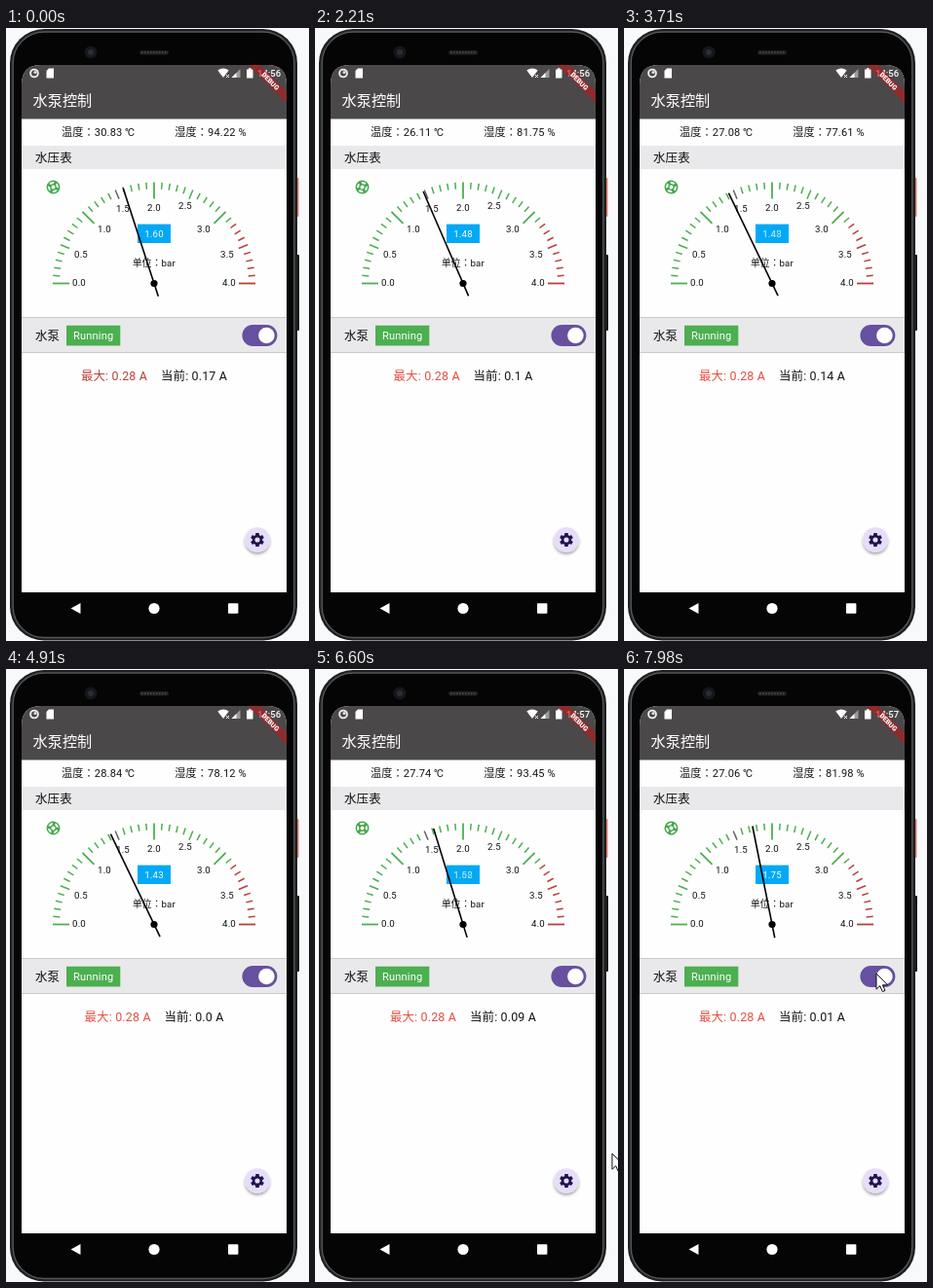
An HTML page for the animation above (8000 ms loop, 311 by 630 pixels).

```html
<!DOCTYPE html>
<html>
<head>
<meta charset="utf-8">
<title>水泵控制</title>
<style>
html, body { margin: 0; width: 100%; height: 100%; overflow: hidden; background: #f8f9fb; }
body { position: relative; font-family: Roboto, "Noto Sans CJK JP", "Noto Sans CJK", sans-serif; letter-spacing: .17px; }
svg { position: absolute; left: 0; top: 0; }
.row { position: absolute; left: 16px; width: 272px; height: 20px; line-height: 20px; display: flex; white-space: pre; color: #151515; }
#climate { top: 98px; font-size: 11.07px; justify-content: space-evenly; }
#amps { top: 347.5px; font-size: 12.46px; justify-content: center; gap: 13.8px; }
</style>
</head>
<body>
<svg width="311" height="630" viewBox="0 0 311 630">
  <defs>
    <clipPath id="screen"><path d="M16 580V58Q16 38 36 38H268Q288 38 288 58V580Z"/></clipPath>
    <filter id="shadow" x="-50%" y="-50%" width="200%" height="200%">
      <feDropShadow dx="0" dy="2" stdDeviation="1.8" flood-opacity=".36"/>
    </filter>
  </defs>

  <!-- phone -->
  <rect x="296" y="154" width="4.5" height="40" rx="1" fill="#d9786a"/>
  <rect x="296" y="233" width="5" height="78" rx="1" fill="#161616"/>
  <rect x="4" y="1" width="295" height="628.5" rx="35" fill="#1d1f20"/>
  <rect x="7.2" y="4" width="288.6" height="622.5" rx="32" fill="#050505" stroke="#55585a" stroke-width="1.4"/>
  <circle cx="87" cy="25" r="6.5" fill="#15171a"/>
  <circle cx="87" cy="25" r="3" fill="#292d35"/>
  <rect x="137" y="23" width="30" height="4.5" rx="2.2" fill="#202020"/>
  <path d="M139 25.2H166" stroke="#454545" stroke-width="2" stroke-dasharray="1.5 1.5"/>

  <!-- screen -->
  <g clip-path="url(#screen)">
    <path fill="#fefefe" d="M16 38H288V580H16Z"/>
    <path fill="#4b484a" d="M16 38H288V93.5H16Z"/>
    <path fill="#e9e9eb" d="M16 121H288V145H16ZM16 297H288V334H16Z"/>
    <path stroke="#c9c9cb" stroke-width="1" d="M16 297.5H288M16 333.5H288"/>
    <g fill="#fff">
      <circle cx="29" cy="46.5" r="3.9" fill="none" stroke="#eee" stroke-width="1.9"/>
      <circle cx="30" cy="45.5" r="1.6" fill="#ddd"/>
      <path d="M44 41.5H49V51.5H41.5V44Z"/>
      <path d="M217.3 43.6Q223 39.2 228.7 43.6L223 51Z"/>
      <path d="M226 48L229 51M229 48L226 51" stroke="#fff"/>
      <path d="M231.5 51L240.5 42V51Z" opacity=".45"/>
      <path d="M231.5 51L236.5 46V51Z"/>
      <path d="M247 42.5H249V41.3H251.5V42.5H253.5V51.5H247Z"/>
      <text id="clock" x="258" y="50" font-size="9.5" font-weight="500" letter-spacing="0"></text>
    </g>
    <g transform="translate(288 38) rotate(45)">
      <rect x="-28" y="19.4" width="56" height="8.3" fill="#b71c1c" fill-opacity=".63"/>
      <text y="26" text-anchor="middle" font-size="7" font-weight="900" letter-spacing="0" fill="#fff">DEBUG</text>
    </g>
  </g>
  <text x="27.5" y="80" font-size="15.2" letter-spacing="0" fill="#fff">水泵控制</text>
  <text x="30" y="137.7" font-size="12.46" fill="#111">水压表</text>
  <text x="30" y="320.8" font-size="12.46" fill="#111">水泵</text>
  <rect x="62" y="305.7" width="55.3" height="20.8" fill="#4caf50"/>
  <text x="89.7" y="320" text-anchor="middle" font-size="11.07" fill="#fff">Running</text>
  <rect x="242.4" y="305" width="36" height="22" rx="11" fill="#66509f"/>
  <circle cx="267.4" cy="316" r="8.3" fill="#fff"/>

  <!-- gauge -->
  <g id="wheel" fill="none" stroke="#43a84a">
    <circle r="6.2" stroke-width="1.5"/>
    <circle r="2.7" stroke-width="1.4"/>
    <path stroke-width="2.7" d="M-6.2 0H-2.7M2.7 0H6.2M0 -6.2V-2.7M0 2.7V6.2"/>
  </g>
  <g id="ticks"></g>
  <g id="labels" font-size="9.69" text-anchor="middle" fill="#111"></g>
  <rect x="135" y="201.6" width="34" height="19.4" fill="#03a9f4"/>
  <g font-size="9.69" text-anchor="middle" fill="#fff">
    <text id="oldValue" x="152" y="215"></text>
    <text id="newValue" x="152" y="215"></text>
  </g>
  <text x="152" y="245.4" font-size="9.69" text-anchor="middle" fill="#111">单位：bar</text>
  <path id="needle" d="M14 0H-103" stroke="#000" stroke-width="1.6"/>
  <circle cx="152" cy="262.5" r="3.6"/>

  <!-- settings button -->
  <circle cx="258" cy="526" r="12.8" fill="#e6ddfa" filter="url(#shadow)"/>
  <g transform="translate(258 526)">
    <path id="cog" stroke="#21124f" stroke-width="3.6"/>
    <circle r="3.9" fill="#e6ddfa" stroke="#21124f" stroke-width="2.7"/>
  </g>

  <!-- navigation -->
  <g fill="#fff">
    <path d="M66.5 596.5L76.5 591V602Z"/>
    <circle cx="152" cy="596.5" r="5.6"/>
    <rect x="228" y="591.3" width="10.4" height="10.4" rx=".8"/>
  </g>
  <path id="cursor" d="M0 0V16.2L3.7 12.7L6.4 18.6L9 17.4L6.4 11.8H11.6Z" fill="#fff" stroke="#111" stroke-width="1"/>
</svg>
<div class="row" id="climate"><span id="temp"></span><span id="humid"></span></div>
<div class="row" id="amps"><span id="peak">最大: 0.28 A</span><span id="current"></span></div>

<script>
const LOOP = 8000, FADE = 300;
const $ = id => document.getElementById(id);

// start time, temperature, humidity, current
const readings = [
  [0, '30.83', '94.22', '0.17'],
  [620, '25.0', '85.22', '0.05'],
  [1560, '26.11', '81.75', '0.1'],
  [2950, '27.08', '77.61', '0.14'],
  [4150, '28.84', '78.12', '0.0'],
  [5500, '27.74', '93.45', '0.09'],
  [7100, '27.06', '81.98', '0.01']
];
// start time, pressure
const pressures = [[0, 1.6], [1750, 1.48], [3560, 1.43], [5350, 1.58], [6450, 1.62], [7350, 1.75]];
// time, x, y
const pointer = [[6400, 312, 504], [6600, 305, 498], [7300, 259, 313]];

const clamp = x => Math.max(0, Math.min(1, x));
const lastIndex = (table, t) => table.findLastIndex(row => row[0] <= t);
const put = (id, text) => { if ($(id).textContent !== text) $(id).textContent = text; };

function add(parent, tag, attrs, text = '') {
  const el = document.createElementNS('http://www.w3.org/2000/svg', tag);
  for (const key in attrs) el.setAttribute(key, attrs[key]);
  el.textContent = text;
  $(parent).append(el);
}

for (let i = 0; i <= 40; i++) {
  const major = i % 10 === 0;
  const length = major ? 17 : i % 5 ? 7 : 10;
  add('ticks', 'path', {
    d: `M-104 0h${length}`,
    transform: `translate(152 262.5) rotate(${i * 4.5})`,
    stroke: i === 15 ? '#666' : i < 32 ? '#4caf50' : '#b9403b',
    'stroke-width': major ? 1.8 : 1.5
  });
}

const labelSpots = [[75, 262], [77, 233], [101, 207], [120, 186], [152, 185], [184, 183], [203, 207], [227, 233], [229, 262]];
labelSpots.forEach(([x, y], i) => add('labels', 'text', { x, y: y + 3.4 }, (i / 2).toFixed(1)));

$('cog').setAttribute('d', [0, 1, 2, 3, 4, 5].map(i => {
  const a = i * Math.PI / 3 + Math.PI / 6;
  return `M${3.8 * Math.cos(a)} ${3.8 * Math.sin(a)}L${6.9 * Math.cos(a)} ${6.9 * Math.sin(a)}`;
}).join(''));

function drawGauge(t) {
  const i = lastIndex(pressures, t);
  const [start, value] = pressures[i];
  const before = i ? pressures[i - 1][1] : value;
  const p = i ? clamp((t - start) / FADE) : 1;
  put('oldValue', before.toFixed(2));
  put('newValue', value.toFixed(2));
  $('oldValue').setAttribute('opacity', 1 - p);
  $('newValue').setAttribute('opacity', p);
  $('needle').setAttribute('transform', `translate(152 262.5) rotate(${value * 45})`);
  $('wheel').setAttribute('transform', `translate(48.5 163.5) rotate(${25 + t * .18})`);
}

function drawPointer(t) {
  $('cursor').setAttribute('visibility', t < pointer[0][0] ? 'hidden' : 'visible');
  const i = Math.max(0, Math.min(lastIndex(pointer, t), pointer.length - 2));
  const [a, b] = [pointer[i], pointer[i + 1]];
  const p = clamp((t - a[0]) / (b[0] - a[0]));
  const ease = i ? p * p * (3 - 2 * p) : p;
  const at = k => a[k] + (b[k] - a[k]) * ease;
  $('cursor').setAttribute('transform', `translate(${at(1)} ${at(2)})`);
}

function draw(t) {
  const [, temp, humid, current] = readings[lastIndex(readings, t)];
  put('temp', `温度：${temp} ℃`);
  put('humid', `湿度：${humid} %`);
  put('current', `当前: ${current} A`);
  put('clock', t < 6200 ? '14:56' : '14:57');
  $('peak').style.color = t < 1690 ? '#b7423a' : '#e54e42';
  drawGauge(t);
  drawPointer(t);
}

const began = performance.now();
function tick() {
  draw((performance.now() - began) % LOOP);
  requestAnimationFrame(tick);
}
tick();
</script>
</body>
</html>
```
